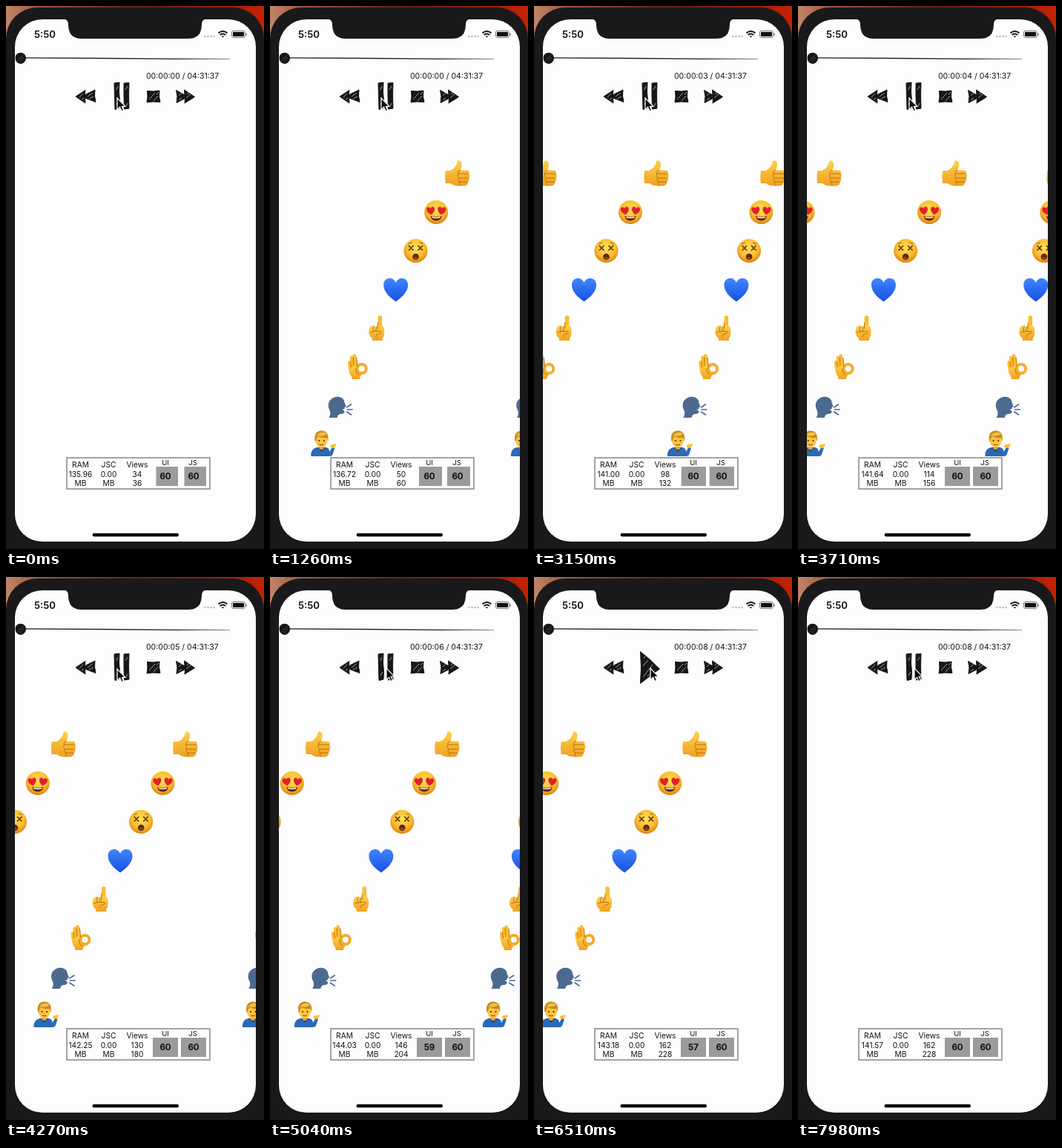
An HTML page for the animation above (8 s loop, 348 by 732 pixels).

```html
<!DOCTYPE html>
<html lang="en">
<head>
<meta charset="utf-8">
<title>Emoji barrage player</title>
<style>
html, body { margin: 0; width: 100%; height: 100%; overflow: hidden; background: #19191b; }
svg { display: block; width: 100vw; height: 100vh; }
text { font-family: Inter, Roboto, sans-serif; fill: #111113; }
.stat { font-size: 10.2px; text-anchor: middle; }
.label { font-size: 9.5px; text-anchor: middle; }
.fps { font-size: 11.5px; font-weight: 700; text-anchor: middle; }
.ink { fill: #161616; stroke: #161616; stroke-width: 1; stroke-linejoin: round; }
.scratch { fill: none; stroke: #fdfdfd; stroke-width: .8; opacity: .75; }
.fold { fill: none; stroke: #b9700f; stroke-width: 1; stroke-linecap: round; }
.finger { fill: none; stroke: #fbbc30; stroke-linecap: round; }
</style>
</head>
<body>
<svg viewBox="0 0 348 732" preserveAspectRatio="none">
<defs>
  <linearGradient id="wall"><stop offset="0" stop-color="#c28468"/><stop offset=".12" stop-color="#a0583c"/><stop offset=".5" stop-color="#5a2414"/><stop offset=".88" stop-color="#a51d05"/><stop offset="1" stop-color="#c42200"/></linearGradient>
  <linearGradient id="skin" x2="0" y2="1"><stop offset="0" stop-color="#ffd04a"/><stop offset="1" stop-color="#f0a021"/></linearGradient>
  <radialGradient id="face" cy=".38" r=".64"><stop offset="0" stop-color="#ffe05a"/><stop offset=".6" stop-color="#fcbd30"/><stop offset="1" stop-color="#d87c12"/></radialGradient>
  <linearGradient id="blue" x2="0" y2="1"><stop offset="0" stop-color="#3f86ff"/><stop offset="1" stop-color="#1650e0"/></linearGradient>
  <clipPath id="view"><rect x="12" y="150" width="325" height="457"/></clipPath>

  <path id="love" d="M0 5.6C-7 1-6.6-4.6-3-5.2Q-.8-5.4 0-3Q.8-5.4 3-5.2C6.6-4.6 7 1 0 5.6Z"/>

  <g id="e0">
    <path fill="url(#skin)" d="M-16-4H-10Q-5-6-2-11Q0-14 0-17Q3-19 5.500-15.500Q7-11 4-4.500H13Q17-4 15.500 0Q18 3 15.500 6Q17 9 14 11Q15 15 10 16.500H0Q-6 16-9 13H-16Q-17.500 4-16-4Z"/>
    <path class="fold" d="M4-4.500Q0-4 1 0H15M1 0Q-1 4 2 6H15M2 6Q0 10 3 11H14M3 11Q2 15 4 16"/>
  </g>
  <g id="e1">
    <circle r="16" fill="url(#face)"/>
    <use href="#love" x="-7" y="-3" transform="rotate(-8)" fill="#e0202c"/>
    <use href="#love" x="7" y="-3" transform="rotate(8)" fill="#e0202c"/>
    <path d="M-7.500 5Q0 7 7.500 5Q6.500 11.500 0 11.500Q-6.500 11.500-7.500 5Z" fill="#64290c"/>
    <path d="M-6 6Q0 7.600 6 6L5 7.700Q0 8.600-5 7.700Z" fill="#fff"/>
  </g>
  <g id="e2">
    <circle r="16" fill="url(#face)"/>
    <path d="M-9-6.500l5.500 5.500m0-5.500l-5.500 5.500M3.500-6.500l5.500 5.500m0-5.500l-5.500 5.500" fill="none" stroke="#5b330c" stroke-width="1.700" stroke-linecap="round"/>
    <path d="M-9.500-9.500l4-1.500M9.500-9.500l-4-1.500" fill="none" stroke="#8f5510" stroke-linecap="round"/>
    <ellipse cy="8" rx="4.300" ry="4.300" fill="#5a2a0c"/>
    <ellipse cy="9.800" rx="2.700" ry="1.800" fill="#93461a"/>
  </g>
  <path id="e3" fill="url(#blue)" d="M0 16.500C-9 10-16.500 3-16.500-6C-16.500-16-4-18.500 0-9C4-18.500 16.500-16 16.500-6C16.500 3 9 10 0 16.500Z"/>
  <g id="e4">
    <path d="M4.500 2V-14" class="finger" stroke-width="5.600"/>
    <path fill="url(#skin)" d="M-9-1Q-5-5-1-2Q1-4 2-3H8Q11 0 10.500 6Q10.500 11 8 14V17H-6V14Q-11 10-10.500 4Z"/>
    <path class="fold" d="M1.500-7V1M-4-2Q-6 2-4 5M0-1Q-2 3 0 5M-8 6Q0 3 6 5Q7 8 2 8Q-1 9-1 12"/>
  </g>
  <g id="e5" >
    <g transform="scale(-1 1)">
      <path class="finger" stroke-width="4.600" d="M3 6Q3-6 5-14.500M7 6Q9-4 8.500-12"/>
      <path class="finger" stroke-width="4.200" d="M9 7Q12 0 11.500-6"/>
      <path fill="url(#skin)" d="M2-1Q8-2 12.500 4Q12 10 9 13L8 17H-2Q-2 14-5 11L0 7Z"/>
      <circle cx="-5" cy="3" r="6" fill="none" stroke="#f3ac2b" stroke-width="4"/>
      <path class="fold" d="M1 0Q1-7 2-12M6-1Q6-8 6.500-12M9 1Q10.500-3 10-6M-1 11Q4 9 3 3"/>
    </g>
  </g>
  <g id="e6">
    <path fill="#4c6a8e" d="M-15 14Q-12 8-14 4Q-18-3-14-9Q-9-15-1-14Q6-12 6-6L8-1L6 0V2L3 3L6 5Q6 9 1 9Q-3 9-4 14Z"/>
    <path d="M9 0l6-4M9.500 3h7M9 6l6 4" fill="none" stroke="#4c6a8e" stroke-width="1.600" stroke-linecap="round"/>
  </g>
  <g id="e7">
    <path fill="#2c69b5" d="M-16 17Q-17 7-8 5H4Q9 6 9 11L13 4L16 6L13 15Q12 17 9 17Z"/>
    <path fill="#174a8a" d="M-7 5L-2 11L4 5Z"/>
    <path fill="#e9a52a" d="M-5 2H1V7Q-2 9-5 7Z"/>
    <ellipse cx="-2" cy="-4.500" rx="8" ry="9.600" fill="#fcc540"/>
    <path fill="#c98a1c" d="M-10.500-3Q-13-16-3-17.500Q9-18 7-3L5.500-8Q-2-7-6-10Q-9-8-9-4Z"/>
    <path fill="#f0c24c" d="M-9-10Q-4-18 5-14Q2-9-6-11Z"/>
    <g fill="#4b2a0b"><circle cx="-5" cy="-4" r="1.100"/><circle cx="1.500" cy="-4" r="1.100"/></g>
    <path d="M-5 1Q-2 2.500 1 1" fill="none" stroke="#8a3f12"/>
    <path fill="#fdbf33" d="M10 5Q9 1 13 1L18 0Q18 3 15 6Z"/>
  </g>
</defs>

<rect width="348" height="732" fill="#19191b"/>
<rect width="348" height="60" fill="url(#wall)"/>
<rect y="2" width="348" height="740" rx="42" fill="#19191b"/>
<rect x="12" y="18" width="325" height="704" rx="37" fill="#fdfdfd"/>
<path d="M78 17.500Q84 18 84 25Q84 44 102 44H246Q264 44 264 25Q264 18 270 17.500Z" fill="#19191b"/>
<text x="38" y="42.500" font-size="13.200" font-weight="600">5:50</text>
<g fill="#b5b5b8"><circle cx="268.500" cy="41" r="1.200"/><circle cx="272.500" cy="41" r="1.200"/><circle cx="276.500" cy="41" r="1.200"/><circle cx="280.500" cy="41" r="1.200"/></g>
<g fill="none" stroke="#111" stroke-width="1.900"><path d="M286.500 36.500Q292.500 31.500 298.500 36.500M288.700 39Q292.500 36 296.300 39"/><path d="M290.500 40.500h4l-2 2z" fill="#111" stroke="none"/></g>
<rect x="304.500" y="33.500" width="18" height="9" rx="2.500" fill="none" stroke="#777"/>
<rect x="306" y="35" width="15" height="6" rx="1.200" fill="#111"/><rect x="323.500" y="36.500" width="1.400" height="3.500" rx=".7" fill="#777"/>

<path d="M20 69.200L130 69.800L230 70.700L302 70.900V71.500L230 72L130 71.200L20 70.600Z" fill="#222"/>
<path class="ink" d="M13 70Q13 64 19 63.500Q26 63 26.500 70Q26 77 20 77.500Q13 77 13 70Z"/>
<path d="M16 74l7-8M19 75l5-6" fill="none" stroke="#555" stroke-width=".8"/>
<text id="clock" x="189" y="97.500" font-size="10.500"></text>

<path class="ink" d="M94 122L107 113.500L106 120L120 113L119.500 121L121 129.500L106.500 124L107 131Z"/>
<path class="scratch" d="M99 123l5-5M110 122l7-5M112 125l6-3M102 126l3-2"/>
<path class="ink" d="M229.500 113.500L241 120L240.500 113L254.500 122.500L241 131L241.500 124.500L230 130.500L231 122Z"/>
<path class="scratch" d="M233 121l4-4M243 124l6-5M244 119l3-3M233 127l4-3"/>
<path class="ink" d="M190.500 114.500L199 115L207 114L206.500 122L208 129.500L198 129L190 130L191 122Z"/>
<path class="scratch" d="M193 126l8-9M199 128l6-7M203 119l3-3"/>
<g id="pause">
  <path class="ink" d="M146 104L153 103L152.500 116L153.500 127L153 138L147 139.500L146.500 124Z"/>
  <path class="ink" d="M159 104L166 103.500L165.500 120L166 138L159.500 139L159 122Z"/>
  <path class="scratch" d="M149 113l2-5M149 133l3-5M161 113l3-5M162 135l2-4"/>
</g>
<g id="play">
  <path class="ink" d="M143.500 100.500L156 111L169.500 124L157 133L143.500 143.500L144.500 122Z"/>
  <path class="scratch" d="M147 120l7-8M147 135l13-17M153 134l8-8M148 110l2-3"/>
</g>

<g id="rows" clip-path="url(#view)"></g>

<rect x="82" y="609" width="193" height="42" fill="none" stroke="#8e8e8e" stroke-width="1.600"/>
<g class="stat">
  <text x="100.500" y="622">RAM</text><text id="ram" x="100.500" y="634.500"></text><text x="100.500" y="646.500">MB</text>
  <text x="138.500" y="622">JSC</text><text x="138.500" y="634.500">0.00</text><text x="138.500" y="646.500">MB</text>
  <text x="177" y="622">Views</text><text id="shown" x="177" y="634.500"></text><text id="total" x="177" y="646.500"></text>
</g>
<text class="label" x="215" y="618.500">UI</text><text class="label" x="252" y="618.500">JS</text>
<rect id="uiBox" y="621" height="26" fill="#9b9b9b"/><rect id="jsBox" y="621" height="26" fill="#9b9b9b"/>
<text id="ui" class="fps" x="215" y="637.500"></text><text class="fps" x="253" y="637.500">60</text>
<rect x="116.500" y="710.800" width="116.500" height="4.400" rx="2.200" fill="#0b0b0c"/>
<path id="cursor" d="M0 0V15.500L3.600 12.200L6 17.500L8.600 16.300L6.300 11.300H11Z" fill="#0a0a0a" stroke="#fff" stroke-width="1.200"/>
</svg>
<script>
const $ = id => document.getElementById(id);
const LOOP = 8000, STEP = 70, PAUSE = 6.44, HALT = 6.51, RESUME = 7.4;
const rowY = [226, 278, 330, 382, 434, 486, 541, 590];
const starts = [.56, 1.285, 2.05, 2.804, 3.515, 4.27, 4.92, 5.63];
const ticks = [...starts, 6.37];

// age of a wave, then x in its top, middle and bottom row
const track = [
  [-.3, 430, 420, 405], [0, 382, 360, 335], [.12, 366, 338, 303], [.346, 322, 264, 196],
  [.76, 241, 139, 52], [.88, 217, 108, 25], [1.1, 165, 53.5, -27], [1.466, 77.5, -27, -84],
  [1.6, 51, -56, -116], [1.865, 14, -95, -150], [2.2, -45, -150, -200]
];
// start, RAM, views shown, views in total
const stats = [
  [0, 135.96, 34, 36], [.6, 136.72, 50, 60], [1.33, 137.61, 66, 84], [2.05, 138.37, 66, 108],
  [2.8, 141, 98, 132], [3.5, 141.64, 114, 156], [4.2, 142.25, 130, 180],
  [4.9, 144.03, 146, 204], [5.63, 143.18, 162, 228], [RESUME, 141.57, 162, 228]
];

const waves = starts.map(() => rowY.map((y, r) => {
  const u = document.createElementNS('http://www.w3.org/2000/svg', 'use');
  u.setAttribute('href', '#e' + r);
  return $('rows').appendChild(u);
}));

function slope(i, c) {
  const a = track[Math.max(i - 1, 0)], b = track[Math.min(i + 1, track.length - 1)];
  return (b[c] - a[c]) / (b[0] - a[0]);
}

function curve(age, c) {
  let i = 0;
  while (i < track.length - 2 && track[i + 1][0] <= age) i++;
  const a = track[i], b = track[i + 1], h = b[0] - a[0], u = (age - a[0]) / h, v = 1 - u;
  return v * v * ((1 + 2 * u) * a[c] + u * h * slope(i, c))
    + u * u * ((1 + 2 * v) * b[c] - v * h * slope(i + 1, c));
}

// parabola through the three guide rows
function rowX(age, r) {
  const top = curve(age, 1), mid = curve(age, 2), low = curve(age, 3);
  const s = (mid - top) / 3.5, bend = ((low - mid) / 3.5 - s) / 7;
  return top + s * r + bend * r * (r - 3.5);
}

const show = (el, on) => el.setAttribute('visibility', on ? 'visible' : 'hidden');

function fpsBox(id, left, right) {
  $(id).setAttribute('x', left);
  $(id).setAttribute('width', right - left);
}

function draw(t) {
  const now = Math.min(t, HALT);
  waves.forEach((wave, n) => {
    const age = now - starts[n];
    const live = t < RESUME && age > -.3 && age < 2.2;
    wave.forEach((el, r) => {
      show(el, live);
      if (live) el.setAttribute('transform', `translate(${rowX(age, r).toFixed(2)} ${rowY[r]})`);
    });
  });

  const sec = Math.max(0, ticks.filter(s => s <= t).length - 1);
  $('clock').textContent = `00:00:0${sec} / 04:31:37`;
  const paused = t >= PAUSE && t < RESUME;
  show($('pause'), !paused);
  show($('play'), paused);

  const [, ram, shown, total] = stats.filter(s => s[0] <= t).pop();
  $('ram').textContent = ram.toFixed(2);
  $('shown').textContent = shown;
  $('total').textContent = total;
  $('ui').textContent = t < 4.9 || t >= RESUME ? 60 : t < 5.63 ? 59 : 57;

  const left = Math.max(198, 202.5 - 1.2 * t);
  fpsBox('uiBox', left, 232);
  fpsBox('jsBox', left + 38, 270);

  const m = Math.min(1, Math.max(0, (t - 4.5) / .4));
  $('cursor').setAttribute('transform', `translate(${150 + 7 * m * m * (3 - 2 * m)} ${124 - m})`);
}

function frame() {
  const ms = performance.now() % LOOP;
  draw(Math.floor(ms / STEP) * STEP / 1000);
  requestAnimationFrame(frame);
}
frame();
</script>
</body>
</html>
```
